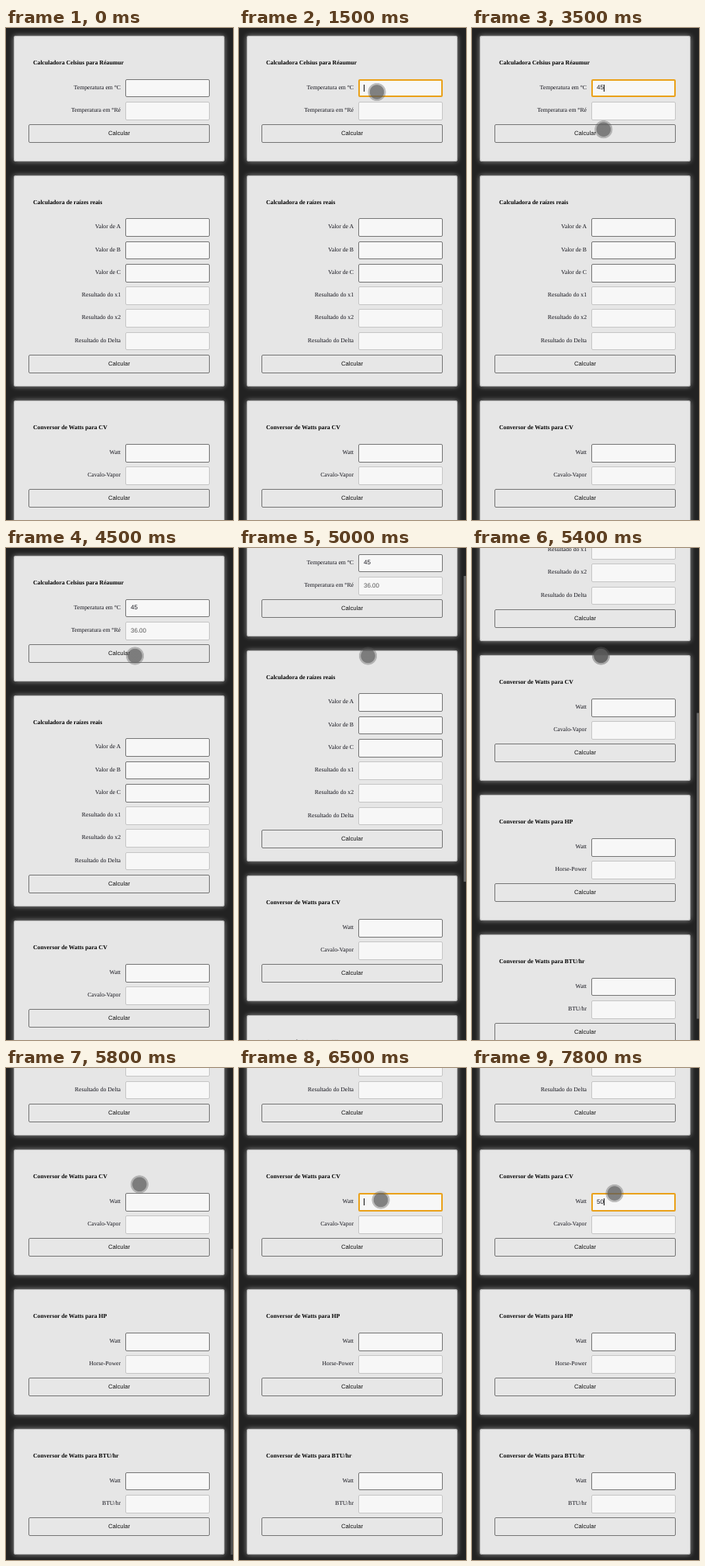
Recreate the animation shown at these times as an HTML page. Size 293 px wide and 634 px high, loop 8 s.

```html
<!DOCTYPE html>
<html lang="pt">
<head>
<meta charset="utf-8">
<title>Calculadoras</title>
<style>
  html, body { margin: 0; width: 100%; height: 100%; overflow: hidden; background: #222; }
  body { position: relative; text-rendering: geometricPrecision; }
  #page { position: absolute; left: 0; top: 0; width: 293px; height: 1020px; }
  .card {
    position: absolute; left: 10px; width: 272px; border-radius: 3px;
    background: #e6e6e6; box-shadow: inset 0 0 0 1px #bbb, 0 0 6px #999;
    font: 7.72px/10px "Liberation Serif", "Times New Roman", serif; color: #14141c;
  }
  .card > * { position: absolute; box-sizing: border-box; white-space: nowrap; }
  .title { left: 25px; top: 30.2px; font-weight: bold; color: #000; }
  .label { right: 134px; }
  .field, .button {
    height: 23.8px; border: 1px solid #767676; border-radius: 2px;
    display: flex; align-items: center;
    font: 8px/10px "Liberation Sans", Arial, sans-serif;
  }
  .field { left: 144px; width: 109px; padding-left: 6px; background: #f7f7f7; }
  .field.result { border-color: #c6c6c6; color: #555; }
  .button { left: 19px; width: 234px; justify-content: center; background: #e7e7e7; font-size: 7.65px; color: #111; }
  .field.focus { border: 2px solid #eaa21c; padding-left: 5px; }
  #caret { width: 1px; height: 9px; margin-right: -1px; background: #111; }
  #thumb { position: absolute; right: 0; top: 0; width: 3px; height: 394px; background: #666; }
  #touch {
    position: absolute; left: -12px; top: -12px; width: 24px; height: 24px; border-radius: 50%;
    background: radial-gradient(circle, rgba(90,90,90,.92) 8.8px, rgba(85,85,85,.46) 9.6px, rgba(85,85,85,.42) 11.2px, transparent 12px);
  }
</style>
</head>
<body>
<div id="page"></div>
<div id="thumb"></div>
<div id="touch"></div>
<script>
const LOOP = 8000, STEP = 100, VIEW = 634, PAGE = 1020;
const MIN_CARD = 162, GAP = 17.9, FIRST_ROW = 55.55, ROW = 29.25;
const page = document.getElementById('page');
const thumb = document.getElementById('thumb');
const touch = document.getElementById('touch');

const converter = (unit, result = unit) => [`Conversor de Watts para ${unit}`, ['Watt'], [result]];
const cards = [
  ['Calculadora Celsius para Réaumur', ['Temperatura em °C'], ['Temperatura em °Ré']],
  ['Calculadora de raízes reais', ['Valor de A', 'Valor de B', 'Valor de C'],
    ['Resultado do x1', 'Resultado do x2', 'Resultado do Delta']],
  converter('CV', 'Cavalo-Vapor'),
  converter('HP', 'Horse-Power'),
  converter('BTU/hr')
];

function add(parent, cls, text = '', top) {
  const el = document.createElement('div');
  el.className = cls;
  el.textContent = text;
  if (top !== undefined) el.style.top = top + 'px';
  return parent.appendChild(el);
}

let nextTop = 10;
function buildCard([title, inputs, results]) {
  const names = [...inputs, ...results];
  const height = Math.max(MIN_CARD, 97 + ROW * names.length);
  const card = add(page, 'card', '', nextTop);
  card.style.height = height + 'px';
  nextTop += height + GAP;
  add(card, 'title', title);
  const fields = names.map((name, i) => {
    const top = FIRST_ROW + ROW * i;
    add(card, 'label', name, top + 6);
    const box = add(card, i < inputs.length ? 'field' : 'field result', '', top);
    return { box, value: add(box, 'value') };
  });
  add(card, 'button', 'Calcular', FIRST_ROW + ROW * names.length);
  return fields;
}

const fields = cards.map(buildCard);
const caret = document.createElement('div');
caret.id = 'caret';

// Each visit: focus, type one character per step, leave.
const visits = [
  { field: fields[0][0], focus: 1000, type: 2900, text: '45', leave: 4300 },
  { field: fields[2][0], focus: 6300, type: 7400, text: '50', leave: LOOP }
];
const answer = { field: fields[0][1], text: '36.00', at: 4400 };
const presses = [[800, 1000], [4300, 4500], [5100, 5500], [6300, 6500]];
const moves = [
  { from: 0, to: 400, x: 178, y: 82.5 },
  { from: 2800, to: 3000, x: 175, y: 84 },
  { from: 3200, to: 3700, x: 167, y: 156 },
  { from: 3700, to: 4000, x: 166.5, y: 139 },
  { from: 5600, to: 6100, x: 183, y: 170 },
  { from: 6700, to: 7500, x: 184, y: 161.5 }
];

function ease(t, from, to) {
  const p = Math.min(1, Math.max(0, (t - from) / (to - from)));
  return p * p * (3 - 2 * p);
}

function drawVisit({ field, focus, type, text, leave }, t) {
  const count = Math.max(0, Math.floor((t - type) / STEP) + 1);
  const active = t >= focus && t < leave;
  field.value.textContent = text.slice(0, count);
  field.box.classList.toggle('focus', active);
  if (!active) return;
  const lastKey = type + (text.length - 1) * STEP;
  const since = t < type ? focus : Math.min(t, lastKey);
  field.box.append(caret);
  caret.style.opacity = (t - since) % 1000 <= 500 ? 1 : 0;
}

function draw(t) {
  const scroll = Math.round(375 * ease(t, 4826, 5528));
  page.style.transform = `translateY(${-scroll}px)`;
  thumb.style.transform = `translateY(${scroll * VIEW / PAGE}px)`;
  thumb.style.opacity = ease(t, 4800, 4900) - ease(t, 5600, 6100);

  let x = 178, y = -14;
  for (const move of moves) {
    const p = ease(t, move.from, move.to);
    x += (move.x - x) * p;
    y += (move.y - y) * p;
  }
  touch.style.transform = `translate(${x}px, ${y}px)`;
  touch.style.opacity = presses.some(([down, up]) => t >= down && t < up) ? 1 : .82;

  caret.remove();
  visits.forEach(visit => drawVisit(visit, t));
  answer.field.value.textContent = t < answer.at ? '' : answer.text;
}

// The screen refreshes ten times a second.
let shown = -1;
function tick() {
  const t = Math.floor(performance.now() % LOOP / STEP) * STEP;
  if (t !== shown) draw(shown = t);
  requestAnimationFrame(tick);
}
tick();
</script>
</body>
</html>
```
